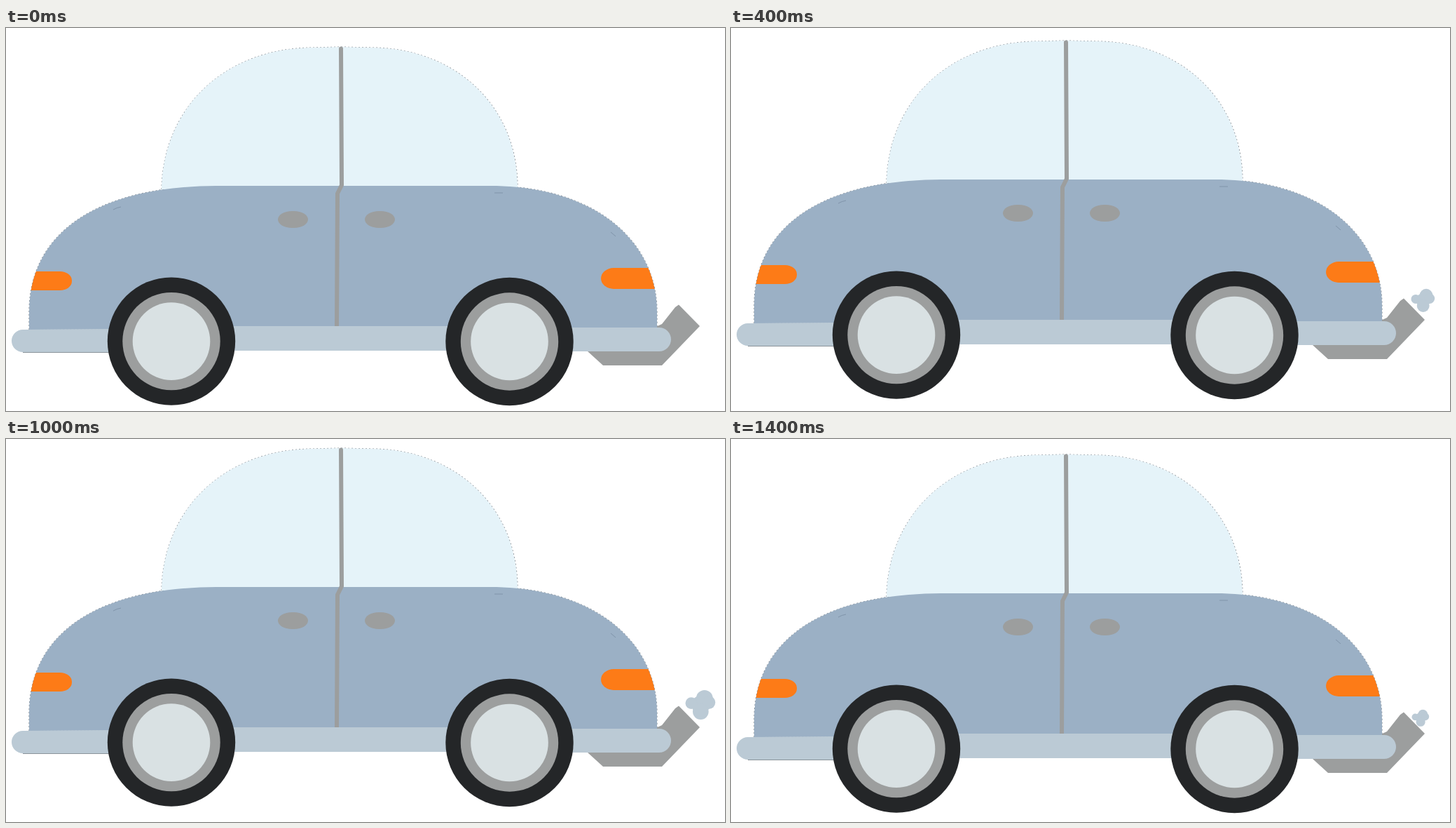
An HTML page for the animation above (1600 ms loop, 1026 by 546 pixels).

```html
<!DOCTYPE html>
<html lang="en">
<head>
<meta charset="utf-8">
<title>Idling car</title>
<style>
  html, body { margin: 0; height: 100%; overflow: hidden; background: #fff; }
  svg { display: block; width: 100vw; height: 100vh; }
</style>
</head>
<body>
<svg viewBox="0 0 1026 546">
  <defs>
    <path id="cabin" d="M222 230C224 114 312 28 440 28L478 27L520 28C640 28 730 110 730 228Z"/>
    <path id="body" d="M33 430V405C33 297 122 226 300 225H690C841 225 929 304 929 405V428Z"/>
    <clipPath id="bodyClip"><use href="#body"/></clipPath>
    <rect id="handle" width="43" height="24" rx="20" ry="12"/>
    <g id="wheel">
      <circle r="91.2" fill="#242628"/>
      <circle r="69.7" fill="#9c9e9e"/>
      <circle r="55.3" fill="#d9e1e3"/>
    </g>
  </defs>
  <!-- Cloud of unit radius -->
  <g id="puff" fill="#bbcad5">
    <circle r=".6"/>
    <circle cx=".25" cy="-.4" r=".55"/>
    <circle cx=".53" cy="-.15" r=".43"/>
    <circle cx="-.62" cy="-.1" r=".38"/>
    <circle cy=".45" r=".52"/>
  </g>
  <g id="car">
    <path d="M830 461L852 481H936L990 425L960 394.5L955 398L936 422L925 427Z" fill="#9c9e9e"/>
    <g fill="none" stroke="#888f96" stroke-width="1.2" stroke-dasharray="2 3">
      <use href="#cabin"/>
      <use href="#body"/>
    </g>
    <use href="#cabin" fill="#e5f3f9"/>
    <use href="#body" fill="#9bb0c5"/>
    <path d="M153 259Q158 256 164 255M697 235H709M863 291L870 297" fill="none" stroke="#8094aa"/>
    <g fill="#fd7b17" clip-path="url(#bodyClip)">
      <rect x="10" y="347" width="84" height="27" rx="17" ry="13"/>
      <rect x="849" y="342" width="110" height="30" rx="18" ry="15"/>
    </g>
    <g fill="#9c9e9e">
      <use href="#handle" x="388" y="261"/>
      <use href="#handle" x="512" y="261"/>
    </g>
    <path d="M478 29.5L479 224L473 236L472 426" fill="none" stroke="#9c9e9e" stroke-width="6" stroke-linecap="round" stroke-linejoin="round"/>
    <path d="M24 462.5H150" stroke="#8a939a"/>
    <path d="M24 430L150 429L325 425H630L812 427H932A17 17 0 0 1 932 461H812L630 460H325L150 462H24A16 16 0 0 1 24 430Z" fill="#bbcad5"/>
    <use href="#wheel" x="236" y="446.6"/>
    <use href="#wheel" x="718.5" y="447"/>
  </g>
</svg>
<script>
  const car = document.getElementById('car');
  const puff = document.getElementById('puff');

  // Four hard steps up, four back down; the puff drifts and swells with each step
  function draw() {
    const tick = Math.floor(performance.now() / 200) % 8;
    const step = Math.min(tick, 8 - tick);
    const size = step && 8 + 4.6 * step;
    car.setAttribute('transform', `translate(0 ${-Math.round(4.7 * step)})`);
    puff.setAttribute('transform',
      `translate(${980.5 + 3.6 * step} ${407 - 9.4 * step}) scale(${size})`);
    requestAnimationFrame(draw);
  }
  draw();
</script>
</body>
</html>
```
